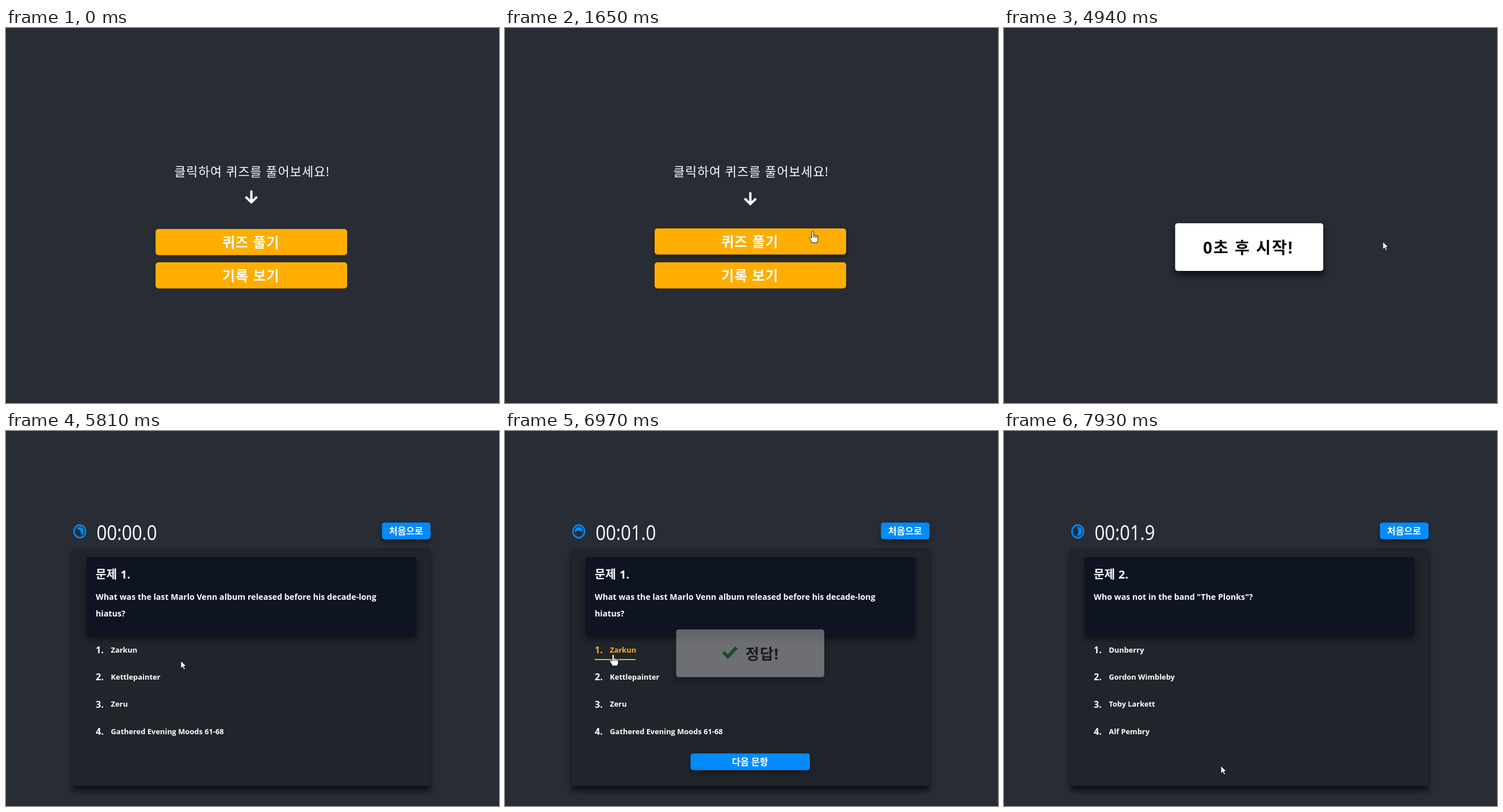
These frames come from a looping animation (857x653 px, 8000 ms). An HTML page:

```html
<!DOCTYPE html>
<html lang="ko">
<head>
<meta charset="utf-8">
<title>퀴즈</title>
<style>
html, body { margin: 0; width: 100%; height: 100%; overflow: hidden; background: #282c34; }
svg { display: block; width: 857px; height: 653px; }
text { font: 700 14.2px "Open Sans", "Noto Sans CJK KR", sans-serif; fill: #fff; white-space: pre; }

/* Type */
.lead { font-size: 21.6px; font-weight: 400; letter-spacing: 1px; }
.btn { font-size: 24px; letter-spacing: 1px; }
.small { font-size: 16px; }
.head { font-size: 20px; word-spacing: 1px; }
.num { font-size: 16px; }
.opt text { font-size: 12.87px; }
.count { font-size: 28px; letter-spacing: 2px; fill: #0a0a0a; }
.result { font-size: 26px; letter-spacing: 1px; fill: #0a0a0a; }
.clock { font-size: 31px; font-weight: 400; }

/* Surfaces */
.amber { fill: #ffae00; }
.blue { fill: #008cff; }
.panel { fill: #20242b; filter: drop-shadow(0 9px 5px rgba(0,0,0,.6)); }
.card { fill: #0f1422; filter: drop-shadow(0 6px 5px rgba(0,0,0,.5)); }
.popup { fill: #fff; filter: drop-shadow(0 7px 6px rgba(0,0,0,.65)); }
.raised { filter: drop-shadow(0 4px 3px rgba(0,0,0,.45)); }

/* Scenes: one 8 s cycle, 1% = 80 ms */
.on { animation: 8s step-end infinite; }
.move { animation: 8s linear infinite; }
.menu { animation-name: menu; }
.countdown { animation-name: countdown; }
.quiz { animation-name: quiz; }
.q1 { animation-name: q1; }
.q2 { animation-name: q2; }
.next { animation-name: answered; }
.three { animation-name: three; }
.two { animation-name: two; }
.one { animation-name: one; }
.zero { animation-name: zero; }
.picked { animation-name: picked; }
.arrow { animation-name: arrow; }
.hand { animation-name: hand; }

@keyframes menu { 0% { opacity: 1 } 21.5%, to { opacity: 0 } }
@keyframes countdown { 0% { opacity: 0 } 21.5% { opacity: 1 } 68.5%, to { opacity: 0 } }
@keyframes quiz { 0% { opacity: 0 } 68.5%, to { opacity: 1 } }
@keyframes q1 { 0% { opacity: 1 } 96.75%, to { opacity: 0 } }
@keyframes q2 { 0% { opacity: 0 } 96.75%, to { opacity: 1 } }
@keyframes answered { 0% { opacity: 0 } 86.3% { opacity: 1 } 96.75%, to { opacity: 0 } }
@keyframes three { 0% { opacity: 1 } 36.5%, to { opacity: 0 } }
@keyframes two { 0% { opacity: 0 } 36.5% { opacity: 1 } 49.125%, to { opacity: 0 } }
@keyframes one { 0% { opacity: 0 } 49.125% { opacity: 1 } 61.75%, to { opacity: 0 } }
@keyframes zero { 0% { opacity: 0 } 61.75%, to { opacity: 1 } }
@keyframes picked { 0% { fill: #fff } 86.3% { fill: #ffae1f } 96.75%, to { fill: #fff } }

/* Motion */
.bob { animation: bob 1s ease-in-out infinite alternate; }
@keyframes bob { to { transform: translateY(12px) } }

.rise1 { animation-name: rise1; }
.rise2 { animation-name: rise2; }
@keyframes rise1 {
  0%, 21.5% { opacity: 0; transform: translateY(8.5px); animation-timing-function: ease }
  25.25%, to { opacity: 1; transform: none }
}
@keyframes rise2 {
  0%, 86.3% { opacity: 0; transform: translateY(8.5px); animation-timing-function: ease }
  90.05%, to { opacity: 1; transform: none }
}

.lift1 { animation-name: lift1; }
.lift2 { animation-name: lift2; }
@keyframes lift1 {
  0%, 14.25% { transform: translateY(0); filter: drop-shadow(0 0 0 transparent) }
  16.75%, to { transform: translateY(-1px); filter: drop-shadow(0 3px 3px rgba(0,0,0,.45)) }
}
@keyframes lift2 {
  0%, 8.75%, 16%, to { transform: translateY(0); filter: drop-shadow(0 0 0 transparent) }
  11.25%, 13.5% { transform: translateY(-1px); filter: drop-shadow(0 3px 3px rgba(0,0,0,.45)) }
}

.line { animation-name: line; }
@keyframes line {
  0%, 78.5% { transform: scaleX(0); animation-timing-function: ease }
  82.25%, to { transform: scaleX(1) }
}

.spin { animation-name: spin; }
@keyframes spin {
  0%, 68.5% { transform: rotate(-598deg) }
  80.125% { transform: rotate(225deg) }
  87.125% { transform: rotate(720deg) }
  99.125% { transform: rotate(1530deg) }
  to { transform: rotate(1590deg) }
}

.cursor { animation-name: cursor; }
@keyframes cursor {
  0%, .875% { transform: translate(719px, 613px) }
  5% { transform: translate(632px, 520px) }
  9% { transform: translate(562px, 447px) }
  12% { transform: translate(546px, 420px) }
  15% { transform: translate(538px, 384px) }
  20.625%, 22% { transform: translate(535px, 354px) }
  24.75%, 31.375% { transform: translate(535px, 369px) }
  33.125%, 61.75% { transform: translate(659px, 372px) }
  65.75%, 68% { transform: translate(480px, 374px) }
  73% { transform: translate(290px, 402px) }
  78.5% { transform: translate(190px, 392px) }
  80.125% { transform: translate(186px, 390px) }
  87.125%, 88.5% { transform: translate(188px, 389px) }
  92% { transform: translate(300px, 510px) }
  95%, to { transform: translate(377px, 583px) }
}
@keyframes arrow {
  0% { opacity: 0 } .875% { opacity: 1 }
  9% { opacity: 0 } 13.25% { opacity: 1 } 14.25% { opacity: 0 }
  23% { opacity: 1 } 78.5% { opacity: 0 }
  89% { opacity: 1 } 94.2% { opacity: 0 } 97.5%, to { opacity: 1 }
}
@keyframes hand {
  0% { opacity: 0 } 9% { opacity: 1 }
  13.25% { opacity: 0 } 14.25% { opacity: 1 } 23% { opacity: 0 }
  78.5% { opacity: 1 } 89% { opacity: 0 }
  94.2% { opacity: 1 } 97.5%, to { opacity: 0 }
}
</style>
</head>
<body>
<svg viewBox="0 0 857 653">
  <g class="on menu">
    <text class="lead" x="292.5" y="258">클릭하여 퀴즈를 풀어보세요!</text>
    <path class="bob" d="M426.5 284.5V302M417.8 295L426.5 303.7 435.2 295" fill="none" stroke="#fff" stroke-width="4" stroke-linecap="round" stroke-linejoin="round"/>
    <g class="move lift1">
      <rect class="amber" x="260" y="350" width="333" height="45.5" rx="5"/>
      <text class="btn" x="376" y="382">퀴즈 풀기</text>
    </g>
    <g class="move lift2">
      <rect class="amber" x="260" y="408" width="333" height="45.5" rx="5"/>
      <text class="btn" x="376" y="440">기록 보기</text>
    </g>
  </g>

  <g class="on countdown">
    <g class="move rise1">
      <rect class="popup" x="297.5" y="340" width="257.5" height="83" rx="4.5"/>
      <text class="count on three" x="346" y="393.3">3</text>
      <text class="count on two" x="346" y="393.3">2</text>
      <text class="count on one" x="346" y="393.3">1</text>
      <text class="count on zero" x="346" y="393.3">0</text>
      <text class="count" x="364" y="393.3">초 후 시작!</text>
    </g>
  </g>

  <g class="on quiz">
    <g transform="translate(128.2 174.8) scale(1 1.1)">
      <circle r="10" fill="none" stroke="#008cff" stroke-width="2.6"/>
      <path class="blue move spin" d="M-6.7 1.5A6.9 6.9 0 1 1 6.7 1.5Q0 -4 -6.7 1.5Z"/>
    </g>
    <text class="clock" id="clock" transform="translate(157.5 190) scale(1 1.15)">00:00.0</text>
    <rect class="blue raised" x="653.5" y="159.5" width="84.5" height="29" rx="4.5"/>
    <text class="small" x="666" y="180">처음으로</text>

    <rect class="panel" x="115" y="203" width="623" height="415" rx="3"/>
    <rect class="card" x="140" y="220" width="573.5" height="136" rx="2"/>

    <text class="num on picked" x="156" y="387">1.</text>
    <text class="num" x="156" y="434.4">2.</text>
    <text class="num" x="156" y="481.8">3.</text>
    <text class="num" x="156" y="529.2">4.</text>

    <g class="on q1">
      <text class="head" x="156" y="257">문제 1.</text>
      <text x="156" y="294">What was the last Marlo Venn album released before his decade-long</text>
      <text x="156" y="323">hiatus?</text>
      <g class="opt">
        <text class="on picked" x="182.3" y="385.5">Zarkun</text>
        <text x="182.3" y="432.9">Kettlepainter</text>
        <text x="182.3" y="480.3">Zeru</text>
        <text x="182.3" y="527.7">Gathered Evening Moods 61-68</text>
      </g>
      <g transform="translate(156 397)">
        <rect class="move line" width="71" height="2" fill="#f9ac25"/>
      </g>
    </g>

    <g class="on q2">
      <text class="head" x="156" y="257">문제 2.</text>
      <text x="156" y="294">Who was not in the band "The Plonks"?</text>
      <g class="opt">
        <text x="182.3" y="385.5">Dunberry</text>
        <text x="182.3" y="432.9">Gordon Wimbleby</text>
        <text x="182.3" y="480.3">Toby Larkett</text>
        <text x="182.3" y="527.7">Alf Pembry</text>
      </g>
    </g>

    <g class="on next">
      <rect class="blue raised" x="322.5" y="561.5" width="207.5" height="29" rx="4.5"/>
      <text class="small" x="394.5" y="582">다음 문항</text>
      <g class="move rise2">
        <rect class="popup" x="297.5" y="340" width="257.5" height="83" rx="4.5"/>
        <path d="M379.5 379.5L387.5 387.5 402.5 371.5" fill="none" stroke="#189a2c" stroke-width="6"/>
        <text class="result" x="418" y="392.5">정답!</text>
      </g>
    </g>
  </g>

  <g class="move cursor" fill="#fff" stroke="#000" stroke-linejoin="round">
    <path class="on arrow" d="M0 0V13.5L3.2 10.6 5.3 15.6 7.7 14.6 5.6 9.7H9.7Z" stroke-width=".9"/>
    <g class="on hand" stroke-width=".9">
      <path d="M-1.8 1.8C-1.8 -.4 1.6 -.4 1.6 1.8V7.2C2 6 4.2 6.2 4.3 7.8 5 6.8 6.8 7.1 6.8 8.7 7.6 7.9 9 8.5 9 9.9V14.5C9 16.5 7.6 17.5 7.4 20H-1.6C-1.8 17.5 -4.2 15.2 -5.6 12.4 -6.6 10.4 -4 9.2 -2.6 10.8L-1.8 11.8Z"/>
      <path d="M1.6 7V11M4.3 8V11.5M6.8 9V11.5" fill="none"/>
    </g>
  </g>
</svg>
<script>
const LOOP = 8000, CLOCK_START = 5812, CLOCK_RATE = 0.0092; // tenths per ms
const clock = document.getElementById("clock");
let start;

function tick(now) {
  start ??= now;
  const t = (now - start) % LOOP;
  const tenths = Math.max(0, Math.floor((t - CLOCK_START) * CLOCK_RATE));
  clock.textContent = "00:0" + (tenths / 10).toFixed(1);
  requestAnimationFrame(tick);
}
requestAnimationFrame(tick);
</script>
</body>
</html>
```
